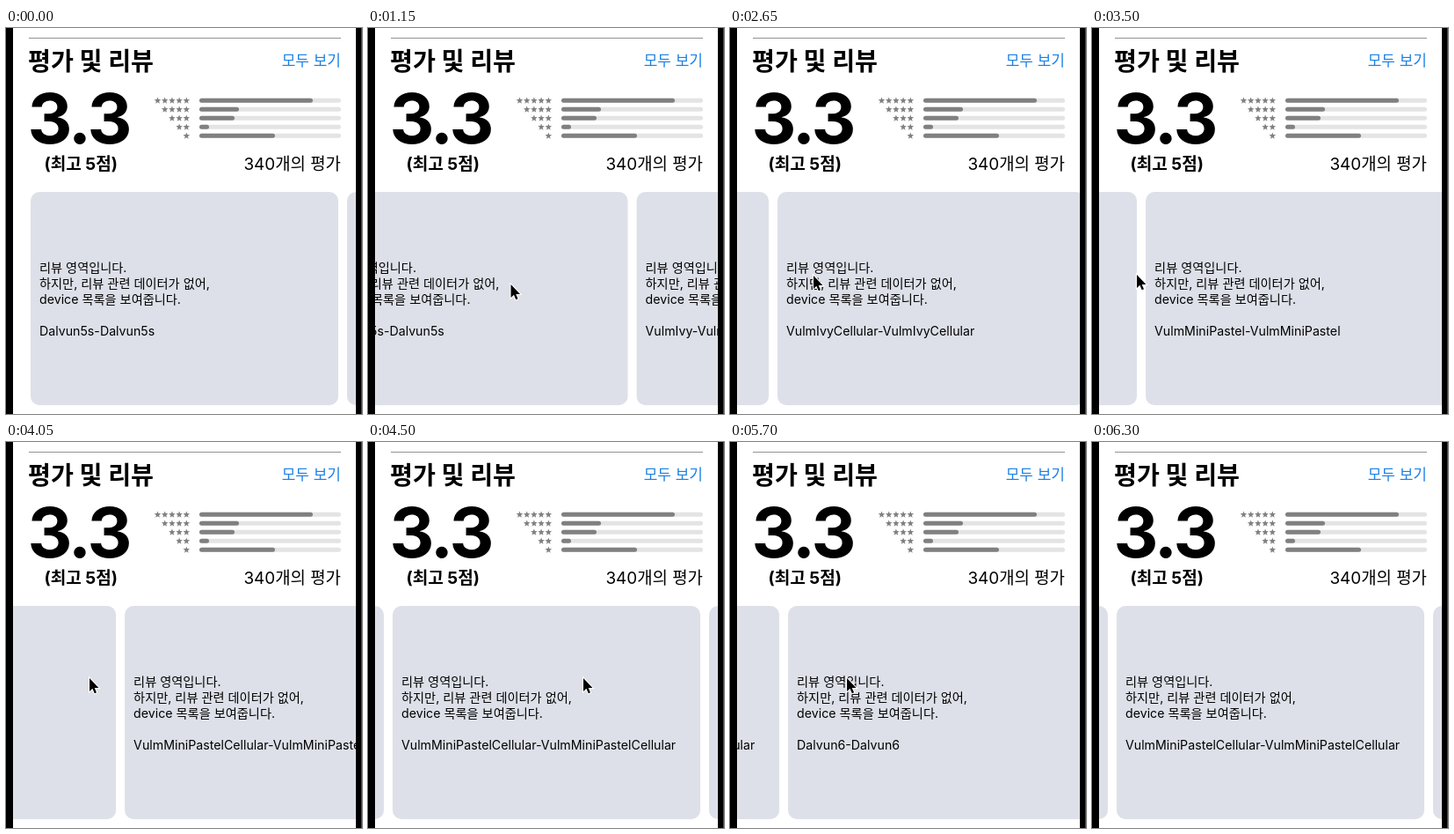
Write an HTML page that moves like this. It is 405 px wide and 438 px high and loops after 7.2 s.

```html
<!DOCTYPE html>
<html lang="ko">
<head>
<meta charset="utf-8">
<style>
  html, body { margin: 0; width: 100%; height: 100%; overflow: hidden; background: #fff; }
  svg { display: block; font-family: Inter, "Noto Sans CJK KR", "Noto Sans CJK", sans-serif; }
  .bold { font-weight: 700; }
  .end { text-anchor: end; }
  .card { font-size: 14.2px; }
  .card rect { fill: #dde0e8; }
</style>
</head>
<body>
<svg width="405" height="438" viewBox="0 0 405 438">
  <path d="M26 11.5H381" stroke="#929292"/>
  <text class="bold" x="25" y="47.5" font-size="28.2">평가 및 리뷰</text>
  <text class="end" x="381" y="43" font-size="17" fill="#1b80e4">모두 보기</text>
  <text class="bold" x="24.5" y="131" font-size="79" letter-spacing="-3">3.3</text>
  <text class="bold" x="43.5" y="161" font-size="19.1">(최고 5점)</text>
  <text class="end" x="381" y="161" font-size="18.9">340개의 평가</text>
  <g id="ratings" fill="#808080"></g>
  <g id="cards"></g>
  <path d="M0 0H8V438H0ZM398 0H405V438H398Z"/>
  <path d="M404.5 0V438" stroke="#0b7a14"/>
  <path id="cursor" d="M0 0V15L3.4 11.8 5.8 17.2 8 16.2 5.7 11H10.5Z"
    stroke="#fff" stroke-width="2" paint-order="stroke"/>
</svg>
<script>
const LOOP = 7200, STEP = 50, PITCH = 360;
const byId = id => document.getElementById(id);
const cards = byId('cards'), cursor = byId('cursor');

const models = ['Dalvun5s', 'VulmIvy', 'VulmIvyCellular', 'VulmMiniPastel',
  'VulmMiniPastelCellular', 'Dalvun6', ''];
const lines = ['리뷰 영역입니다.', '하지만, 리뷰 관련 데이터가 없어,', 'device 목록을 보여줍니다.'];

const line = (text, row) => `<text x="10" y="${276.5 + row * 18}">${text}</text>`;
cards.innerHTML = models.map((name, i) => `
  <g class="card" transform="translate(${i * PITCH} 0)">
    <rect y="186" width="350" height="242" rx="10"/>
    ${name && [...lines, '', `${name}-${name}`].map(line).join('')}
  </g>`).join('');

function star(cx, cy) {
  const points = Array.from({ length: 10 }, (_, i) => {
    const a = i * Math.PI / 5, r = i % 2 ? 1.7 : 4;
    return `${(cx + r * Math.sin(a)).toFixed(2)},${(cy - r * Math.cos(a)).toFixed(2)}`;
  });
  return `<polygon points="${points.join(' ')}"/>`;
}

const bar = (y, end, color) =>
  `<rect x="220" y="${y - 2.5}" width="${end - 220}" height="5" rx="2.5" fill="${color}"/>`;

byId('ratings').innerHTML = [349, 265, 260, 231, 306].map((end, row) => {
  const y = 82.3 + row * 10;
  let out = bar(y, 381, '#e4e4e4') + bar(y, end, '#808080');
  for (let i = 0; i < 5 - row; i++) out += star(205.3 - i * 8.2, y + .2);
  return out;
}).join('');

// Each swipe drags the pointer from grab to drop and glides on to a card.
const swipes = [
  { at: 250, ms: 1, card: 0, grab: 200, drop: 200, y: 157 },
  { at: 1050, ms: 820, card: 1, grab: 245, drop: 135, y: 291 },
  { at: 2250, ms: 547, card: 2, grab: 245, drop: 95, y: 281 },
  { at: 3100, ms: 574, card: 3, grab: 245, drop: 51, y: 280 },
  { at: 3800, ms: 550, card: 4, grab: 245, drop: 95, y: 268 },
  { at: 4500, ms: 650, card: 5, grab: 245, drop: 95, y: 268 },
  { at: 5670, ms: 552, card: 4, grab: 95, drop: 245, y: 268 }
];

const progress = (t, start, end) => Math.min(1, Math.max(0, (t - start) / (end - start)));
const easeOut = p => 1 - (1 - p) ** 2;
const mix = (a, b, p) => a + (b - a) * p;

function pose(t) {
  const i = Math.max(0, swipes.filter(s => s.at <= t).length - 1);
  const now = swipes[i], before = swipes[i - 1] || now, next = swipes[i + 1] || { ...now, grab: now.drop };
  const end = now.at + now.ms;
  const moved = PITCH * (now.card - before.card) * easeOut(progress(t, now.at, end));
  const reach = now.grab - now.drop;
  const dragX = now.grab - Math.sign(reach) * Math.min(Math.abs(moved), Math.abs(reach));
  const travel = t > end ? progress(t, end, next.at) : 0;
  return {
    scroll: before.card * PITCH + moved,
    x: mix(dragX, next.grab, travel),
    y: mix(now.y, next.y, travel)
  };
}

function draw() {
  const t = Math.floor(performance.now() % LOOP / STEP) * STEP;
  const { scroll, x, y } = pose(t);
  cards.setAttribute('transform', `translate(${28 - scroll} 0)`);
  cursor.setAttribute('transform', `translate(${x} ${y})`);
  cursor.setAttribute('visibility', t >= 250 && t < 6300 ? 'visible' : 'hidden');
  requestAnimationFrame(draw);
}
draw();
</script>
</body>
</html>
```
